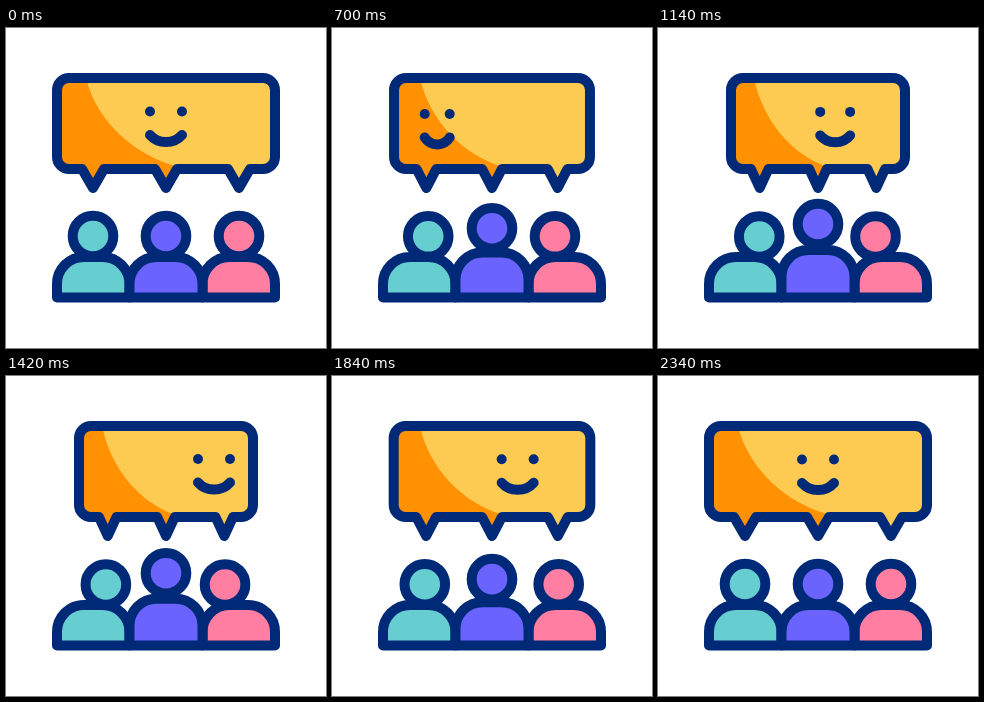
Write an HTML page that moves like this. It is 320x320 px and loops after 2.42 s.

```html
<!DOCTYPE html>
<html lang="en">
<head>
<meta charset="utf-8">
<title>Group feedback</title>
<style>
  html, body { margin: 0; width: 100%; height: 100%; overflow: hidden; background: #fff; }
  svg { display: block; width: 100%; height: 100%; }
  .line { stroke: #002a77; stroke-width: 10; stroke-linecap: round; stroke-linejoin: round; }
</style>
</head>
<body>
<svg viewBox="0 0 320 320">
  <defs><clipPath id="inside"><path id="clip"/></clipPath></defs>
  <path id="fill" fill="#fecb52"/>
  <path id="shade" fill="#ff9102" clip-path="url(#inside)"/>
  <path id="edge" class="line" fill="none"/>
  <g fill="#002a77">
    <circle id="eyeL" r="5"/>
    <circle id="eyeR" r="5"/>
  </g>
  <path id="mouth" class="line" fill="none"/>
  <g class="line">
    <path id="bodyL" fill="#66cdd0"/>
    <path id="bodyR" fill="#ff7ea1"/>
    <path id="bodyM" fill="#6b63fd"/>
    <circle id="headL" r="20.3" fill="#66cdd0"/>
    <circle id="headR" r="20.3" fill="#ff7ea1"/>
    <circle id="headM" r="20.3" fill="#6b63fd"/>
  </g>
</svg>
<script>
const LOOP = 2420, END = 2340;
const $ = id => document.getElementById(id);
const set = (id, attrs) => {
  for (const k in attrs) $(id).setAttribute(k, attrs[k]);
};

// Smooth progress from 0 to 1 between two times
const ease = (t, a, b) => {
  const u = Math.min(1, Math.max(0, (t - a) / (b - a)));
  return (1 - Math.cos(Math.PI * u)) / 2;
};

function bubble(s) {
  const x = v => 160 + v * s;
  const tail = c => `H${x(c + 11)}L${x(c)} 160L${x(c - 11)} 141`;
  const l = x(-109), r = x(109), k = 12;
  return `M${l + k} 50H${r - k}A${k} ${k} 0 0 1 ${r} 62V129A${k} ${k} 0 0 1 ${r - k} 141` +
    tail(73) + tail(0) + tail(-73) +
    `H${l + k}A${k} ${k} 0 0 1 ${l} 129V62A${k} ${k} 0 0 1 ${l + k} 50Z`;
}

function shade(s) {
  const x = v => 160 + v * s;
  return `M${x(-80)} 50C${x(-70)} 92 ${x(-32)} 128 ${x(13)} 139V165H40V50Z`;
}

function body(l, r, top) {
  const y = top + 27;
  return `M${l} 269.5V${y}C${l} ${top + 12} ${l + 12} ${top} ${l + 27} ${top}` +
    `H${r - 27}C${r - 12} ${top} ${r} ${top + 12} ${r} ${y}V269.5Z`;
}

function draw(t) {
  const squeeze = ease(t, 245, 1155) - ease(t, 1510, 2160);
  const s = 1 - 22 * squeeze / 109;
  const outline = bubble(s);
  for (const id of ['clip', 'fill', 'edge']) set(id, { d: outline });
  set('shade', { d: shade(s) });

  const left = ease(t, 0, 530) - ease(t, 680, 1410);
  const right = ease(t, 680, 1410) - ease(t, 1540, 2170);
  const cx = 160 - 55 * left + 48 * right;
  const half = 16 - 3.5 * left;
  const dy = 2.5 * left - 0.5 * right;
  set('eyeL', { cx: cx - half, cy: 83.5 + dy });
  set('eyeR', { cx: cx + half, cy: 83.5 + dy });
  const my = 107 + dy;
  set('mouth', {
    d: `M${cx - half} ${my}C${cx - half / 2} ${my + 9.3} ${cx + half / 2} ${my + 9.3} ${cx + half} ${my}`
  });

  const lean = ease(t, 0, 1180) - ease(t, 1180, 2360);
  set('headL', { cx: 87 + 14.3 * lean, cy: 208 + 0.5 * lean });
  set('headR', { cx: 233 - 15.5 * lean, cy: 208 + 0.5 * lean });
  set('headM', { cx: 160, cy: 208 - 12 * lean });
  set('bodyM', { d: body(123.5, 196.5, 229 - 7 * lean) });
}

set('bodyL', { d: body(51, 123.5, 229) });
set('bodyR', { d: body(196.5, 269, 229) });

const start = performance.now();
function tick() {
  draw(Math.min(END, (performance.now() - start) % LOOP));
  requestAnimationFrame(tick);
}
tick();
</script>
</body>
</html>
```
